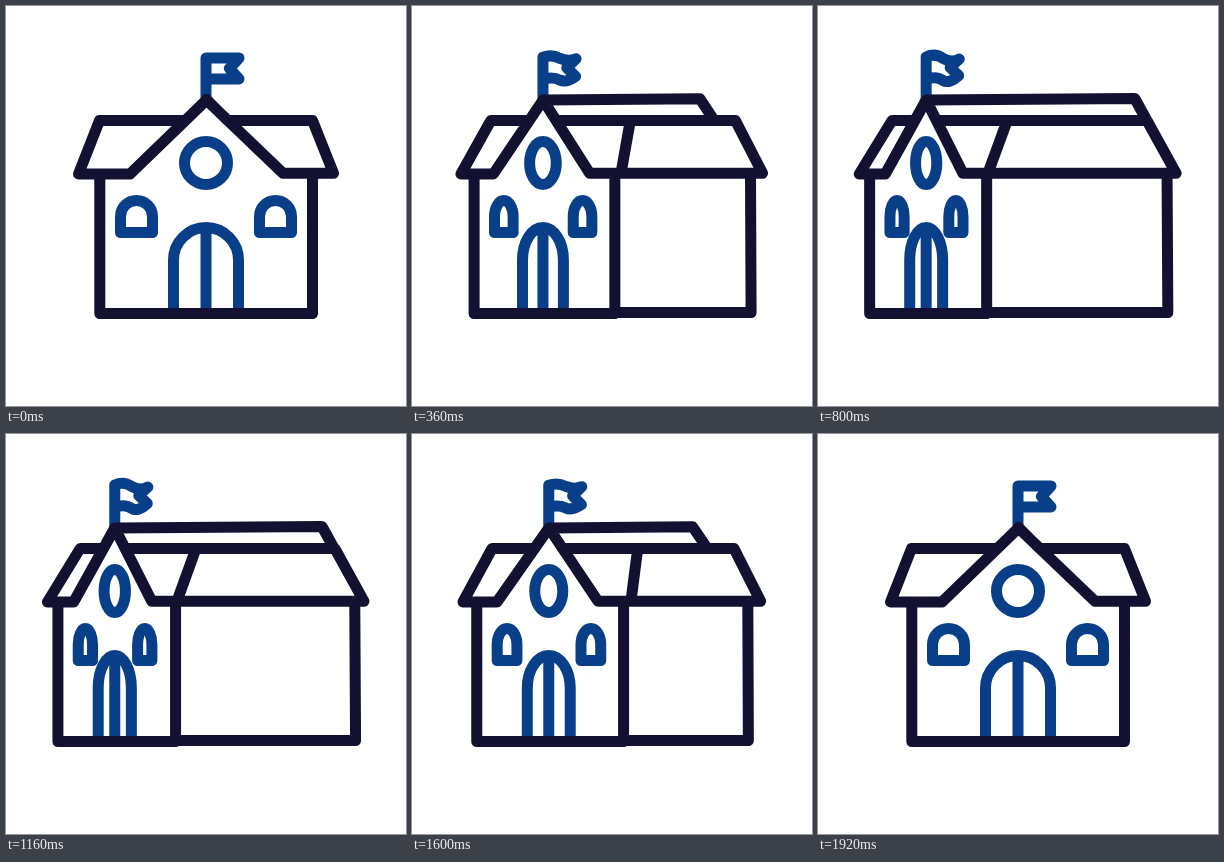
An HTML page that plays this animation: 400x400 px, repeating every 2 s.

```html
<!DOCTYPE html>
<html lang="en">
<head>
<meta charset="utf-8">
<title>Turning school</title>
<style>
  html, body { margin: 0; width: 100%; height: 100%; overflow: hidden; background: #fff; }
  svg { display: block; width: 100vw; height: 100vh; }
  path { fill: none; stroke-width: 11; stroke-linejoin: round; }
  #accent { stroke: #093f88; }
  #outline { stroke: #121131; stroke-linecap: round; }
</style>
</head>
<body>
<svg viewBox="0 0 400 400">
  <path id="accent"/>
  <path id="outline"/>
</svg>
<script>
const LOOP = 2000, STEP = 40, HALF = 960;
const accent = document.getElementById('accent');
const outline = document.getElementById('outline');

// Cubic ease with control points (.343, 0) and (0, 1).
function ease(u) {
  let lo = 0, hi = 1;
  for (let i = 0; i < 30; i++) {
    const s = (lo + hi) / 2;
    if (3 * .343 * s * (1 - s) ** 2 + s ** 3 < u) lo = s; else hi = s;
  }
  return lo * lo * (3 - 2 * lo);
}

const line = (...points) => 'M' + points.map(p => p.join(' ')).join('L');

const arch = (cx, half, spring, rise, bottom) =>
  `M${cx - half} ${bottom}V${spring}a${half} ${rise} 0 0 1 ${2 * half} 0V${bottom}`;

const oval = (cx, cy, rx, ry) =>
  `M${cx - rx} ${cy}a${rx} ${ry} 0 1 1 ${2 * rx} 0a${rx} ${ry} 0 1 1 ${-2 * rx} 0Z`;

function flag(x, turn) {
  const pt = (x0, y0, x1, y1) => `${x + x0 + (x1 - x0) * turn} ${y0 + (y1 - y0) * turn} `;
  return `M${x} 96L` + pt(0, 52, 0, 51)
    + 'C' + pt(6, 52, 6, 48) + pt(12, 52, 12, 49) + pt(17, 52, 17, 52.5)
    + 'C' + pt(22, 52, 22, 55.5) + pt(28, 52, 28, 56) + pt(33, 52, 33, 53)
    + 'L' + pt(23.5, 62.5, 24, 61.5)
    + 'L' + pt(33, 73, 32.5, 69.5)
    + 'C' + pt(28, 73, 27, 75) + pt(22, 73, 21, 77) + pt(17, 73, 17, 74.5)
    + 'C' + pt(12, 73, 12, 71) + pt(6, 73, 6, 71) + pt(0, 73, 0, 73.5);
}

function draw(time) {
  const t = Math.min(Math.floor(time / STEP) * STEP, 2 * HALF);
  const turn = ease(1 - Math.abs(t - HALF) / HALF);
  const move = (from, by) => from + by * turn;

  const center = move(200, -92.8);
  const half = move(16, -9);
  const pane = cx => arch(cx, half, 210.5, 16, 226.5) + 'Z';
  accent.setAttribute('d',
    flag(center, turn)
    + oval(center, 157, move(21.5, -11), 21.5)
    + pane(move(130.5, -52)) + pane(move(269.5, -133))
    + arch(center, move(32.5, -16.2), 254, 32.5, 304)
    + line([center, 222], [center, 304]));

  const top = 114.5, eave = 167.3, base = 307.5, rearBase = 306.5;
  const apex = [move(200.5, -93.3), 94];
  const leftValley = [move(124, -57.3), 168];
  const rightValley = [move(277, -133.5), eave];
  const leftEave = [move(72.5, -31.6), 168];
  const rightEave = [move(327.5, 31), eave];
  const frontEave = [move(327.5, -159.3), eave];
  const rearTop = [move(306.5, 22.7), top];
  const leftWall = move(93.8, -42.6);
  const frontWall = move(306.5, -139.3);
  const rearWall = move(306.5, 43.8);
  const ridge = move(200.5, 117.5);
  const onSlope = valley => [apex[0] + (valley[0] - apex[0]) * (top - 94) / (valley[1] - 94), top];

  outline.setAttribute('d',
    line([leftWall, 168], [leftWall, base], [frontWall, base], [frontWall, eave])
    + line([frontWall, rearBase], [rearWall, rearBase], [move(306.5, 43), eave])
    + line(onSlope(leftValley), [move(93.5, -19.7), top], leftEave, leftValley, apex, rightValley, rightEave, rearTop, onSlope(rightValley))
    + line(frontEave, [move(306.5, -118.5), top])
    + line(apex, [ridge, move(93.3, -.8)], [ridge + move(21, -9), top]));
}

function tick() {
  draw(performance.now() % LOOP);
  requestAnimationFrame(tick);
}
tick();
</script>
</body>
</html>
```
